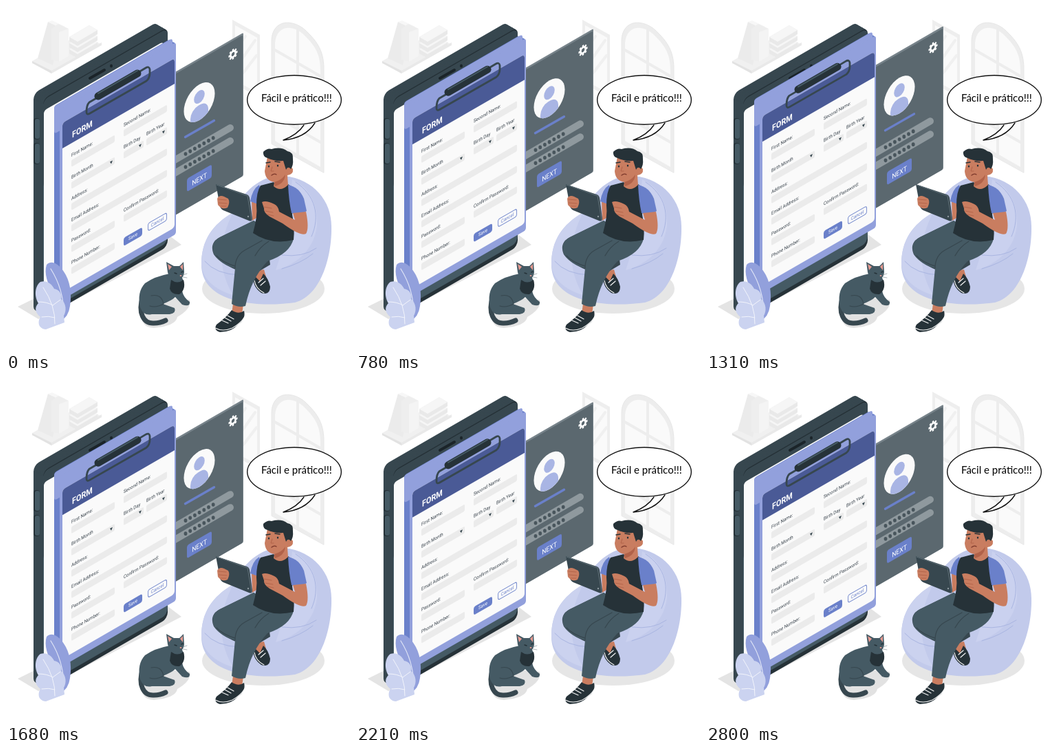
These frames come from a looping animation (500x500 px, 2840 ms). An HTML page with a canvas:

```html
<!DOCTYPE html>
<html lang="pt">
<head>
<meta charset="utf-8">
<title>Form illustration</title>
<style>
html, body { margin: 0; width: 100%; height: 100%; overflow: hidden; background: #fff; }
canvas { display: block; width: 100vw; height: 100vh; }
</style>
</head>
<body>
<canvas id="stage" width="500" height="500"></canvas>
<script>
const ctx = document.getElementById('stage').getContext('2d');
const LOOP = 2840, PEAK = 1360, RISE = 10;
const COS = 0.866, SIN = 0.5;
const INK = '#263238', SLATE = '#37474f', STEEL = '#455a64';
const BLUE = '#6a80ca', LILAC = '#92a0dc', NAVY = '#4a5a96', PALE = '#c2caeb';
const SKIN = '#c97d60', TAN = '#b16249';

function fill(d, color) {
  ctx.fillStyle = color;
  ctx.fill(new Path2D(d));
}

function line(d, color, width = 1) {
  ctx.strokeStyle = color;
  ctx.lineWidth = width;
  ctx.lineCap = ctx.lineJoin = 'round';
  ctx.stroke(new Path2D(d));
}

function oval(x, y, rx, ry, color, turn = 0) {
  ctx.beginPath();
  ctx.ellipse(x, y, rx, ry, turn, 0, Math.PI * 2);
  ctx.fillStyle = color;
  ctx.fill();
}

function box(x, y, w, h, r, color, outline) {
  ctx.beginPath();
  ctx.roundRect(x, y, w, h, r);
  if (outline) {
    ctx.strokeStyle = color;
    ctx.lineWidth = 1;
    ctx.stroke();
  } else {
    ctx.fillStyle = color;
    ctx.fill();
  }
}

// Draws on an isometric wall whose local origin is at (x, y).
function wall(x, y, draw) {
  ctx.save();
  ctx.transform(COS, -SIN, 0, 1, x, y);
  draw();
  ctx.restore();
}

const wallBox = (x, y, w, h, r, color, outline) =>
  wall(x, y, () => box(0, 0, w / COS, h, r, color, outline));

function wallText(text, x, y, size, color, weight = 400, align = 'left') {
  wall(x, y, () => {
    ctx.font = `${weight} ${size}px Roboto, sans-serif`;
    ctx.textAlign = align;
    ctx.textBaseline = 'middle';
    ctx.fillStyle = color;
    ctx.fillText(text, 0, 0);
  });
}

function slab(x, y, w, h, r, depth, side) {
  for (let i = depth; i > 0; i--) wallBox(x - i, y - i * 0.57, w, h, r, side);
}

function drawBooks() {
  fill('M38 80L110 40L139 56L66 98Z', '#f0f0f0');
  fill('M38 80L66 94L66 98L38 83Z', '#e2e2e2');
  fill('M66 94L139 53V57L66 98Z', '#e9e9e9');
  fill('M46 76L61 23L81 32L68 86Z', '#ebebeb');
  fill('M61 23L67 21L86 30L81 33Z', '#f7f7f7');
  fill('M66 33L76 26L91 33V73L77 81L66 78Z', '#eeeeee');
  fill('M77 38L91 33V73L77 81Z', '#f4f4f4');
  for (let i = 0; i < 3; i++) {
    const y = 63 - i * 9;
    fill(`M92 ${y}L121 ${y - 17}L133 ${y - 10}V${y - 4}L104 ${y + 13}L92 ${y + 6}Z`, '#e9e9e9');
    fill(`M92 ${y}L121 ${y - 17}L133 ${y - 10}L104 ${y + 7}Z`, '#f6f6f6');
  }
}

function drawWindows() {
  fill('M329 20L369 42V134L329 111Z', '#eeeeee');
  fill('M333 28L365 46V126L333 108Z', '#fafafa');
  line('M336 62L348 44M338 84L362 50M345 97L364 72', '#f0f0f0', 4);
  const arch = 'M386 200V50C387 18 420 17 440 40C456 56 462 70 462 92V242Z';
  fill(arch, '#ededed');
  fill('M391 196V54C393 27 419 25 437 46C452 61 457 74 457 94V234Z', '#fafafa');
  line('M424 34V216M391 64L457 102M391 112L457 150M391 160L457 198', '#ededed', 4);
  line(arch, '#e7e7e7');
}

function drawPhone() {
  fill('M17 437L234 331L255 347L47 455Z', '#e4e4e4');
  slab(54, 135, 181, 319, 9, 14, SLATE);
  wallBox(54, 135, 181, 319, 9, INK);
  wallBox(54, 137, 181, 311, 9, STEEL);
  wallBox(54, 137, 181, 130, 9, SLATE);
  wallBox(55, 152, 174, 257, 5, '#fafafa');
  line('M122 105L143 93', '#1b2429', 4);
  oval(153, 87, 2, 2.5, '#1b2429');
  for (const y of [163, 199]) {
    box(40, y, 9, 31, 4, INK);
    box(42, y + 1, 7, 29, 3, STEEL);
  }
}

function drawGear() {
  wall(330, 70, () => {
    ctx.strokeStyle = '#fff';
    ctx.lineCap = 'butt';
    ctx.lineWidth = 3;
    ctx.beginPath();
    ctx.arc(0, 0, 4.2, 0, Math.PI * 2);
    ctx.stroke();
    for (let i = 0; i < 8; i++) {
      ctx.rotate(Math.PI / 4);
      ctx.fillStyle = '#fff';
      ctx.fillRect(4.5, -1.4, 3, 2.8);
    }
  });
}

function drawLogin() {
  wallBox(232, 104, 113, 208, 2, '#77838a');
  wallBox(232, 107, 112, 205, 2, '#5b686f');
  drawGear();
  wall(281, 140, () => {
    oval(0, 0, 26, 26, '#fafafa');
    ctx.beginPath();
    ctx.arc(0, 0, 26, 0, Math.PI * 2);
    ctx.clip();
    oval(0, -8, 9, 9, '#a9b5e4');
    box(-15, 4, 30, 30, 13, '#a9b5e4');
  });
  line('M260.5 190.5L302.500 166.500', BLUE, 3.4);
  for (const y of [177, 196]) {
    line(`M240 ${y + 50}L326 ${y}`, '#8f999e', 10);
    for (let i = 0; i < 7; i++) oval(261 + i * 6.7, y + 38 - i * 3.87, 2.4, 2.8, '#48555c');
  }
  wallBox(263, 251, 36, 19, 3, BLUE);
  wallText('NEXT', 281, 252, 10, '#fff', 400, 'center');
}

function drawField(label, x, y, w, arrow) {
  wallText(label, x, y + 0.5, 7, '#37414a');
  wallBox(x, y + 7, w, 10, 2, '#ebebeb');
  if (arrow) {
    const ax = x + w - 5, ay = y + 12 - (w - 5) * 0.577;
    fill(`M${ax - 2} ${ay - 1}L${ax + 2} ${ay - 3}L${ax} ${ay + 2}Z`, SLATE);
  }
}

function drawClipboard() {
  slab(78, 150, 169, 279, 4, 8, BLUE);
  wallBox(70, 146, 172, 40, 4, LILAC);
  wallBox(78, 150, 169, 279, 4, LILAC);
  wallBox(82, 170, 163, 246, 5, '#fafafa');
  wallBox(82, 170, 163, 37, [5, 5, 0, 0], NAVY);
  wallText('FORM', 96, 188, 12.5, '#fff', 700);

  const wire = 'M133 133L121 140Q117 144 117 154Q117 159 122 156L204 109Q209 105 209 97V92Q208 87 203 90L193 96';
  line(wire, SLATE, 2.8);
  line('M134 131L191 98', INK, 11);
  line('M134 127L191 94', STEEL, 2);

  const left = 95, right = 171;
  drawField('First Name:', left, 217, 63);
  drawField('Second Name:', right, 173, 63);
  drawField('Birth Month', left, 249, 63, true);
  drawField('Birth Day', right, 205, 29, true);
  drawField('Birth Year', 204, 186, 30, true);
  drawField('Address:', left, 280, 139);
  drawField('Email Address:', left, 311, 139);
  drawField('Password:', left, 341, 63);
  drawField('Confirm Password:', right, 297, 63);
  drawField('Phone Number:', left, 373, 63);
  wallBox(171, 337, 27, 12, 3, BLUE);
  wallText('Save', 184.5, 335, 7, '#fff', 400, 'center');
  wallBox(206.5, 316, 27, 11, 3, BLUE, true);
  wallText('Cancel', 220, 314, 7, BLUE, 400, 'center');
}

function drawLeaves() {
  fill('M59 376C68 367 80 378 87 391C95 406 95 424 93 436Q91 452 79 458L70 420C60 404 55 388 59 376Z', LILAC);
  line('M65 382Q84 412 84 448', '#dfe4f6', 1.2);
  fill('M50 401C60 398 67 405 70 411C78 412 82 420 80 426C88 432 88 444 84 450L85 460L58 470C46 469 46 458 50 452C40 444 43 436 47 432C40 420 43 406 50 401Z', '#cbd3f0');
  line('M54 409Q72 436 71 462M47 430Q60 430 68 435M52 452Q62 450 71 453M79 427L68 435', '#f3f5fc');
}

function drawCat() {
  fill('M198 447Q195 467 215 468Q247 465 249 452Q270 440 267 427L235 424Z', '#e2e2e2');
  line('M199 422C191 446 200 462 215 461Q224 461 232 457', SLATE, 7);
  fill('M238 389Q216 393 202 403Q190 416 195 438Q200 451 212 448L238 448Q248 446 245 439L228 433Q241 428 246 423L256 434Q268 438 267 430Q258 424 256 414Q261 404 256 395Z', STEEL);
  fill('M240 398Q249 405 258 398Q262 412 252 419Q241 420 238 411Z', INK);
  line('M211 421Q226 418 229 433Q218 439 209 436', SLATE, 1.2);
  fill('M235 387L233 372L244 378L252 378L258 372L259 387Q258 398 247 398Q237 398 235 387Z', STEEL);
  fill('M235 375L237 384L241 379ZM253 379L257 375L257 384Z', '#e79a91');
  line('M245 388L248 389M255 387L257 386', INK, 1.4);
  line('M257 391L263 389M257 394L263 395', '#8d989e', 0.7);
  oval(254, 392, 1.4, 1, '#e79a91');
}

function drawBeanbag() {
  oval(374, 411, 89, 36, '#e6e6e6');
  fill('M284 376C284 340 300 318 330 300C345 268 373 244 405 247C448 252 473 284 473 320C474 360 460 420 420 431C370 438 284 434 284 376Z', PALE);
  fill('M284 376C284 340 300 318 330 300C310 340 306 380 330 420C302 412 286 396 284 376Z', '#cbd2ef');
  fill('M416 252C442 264 454 290 452 320C448 350 428 374 392 384L407 336Z', '#cad1ef');
  line('M421 256C450 275 457 306 444 335M451 352Q431 366 401 362M289 371Q305 390 340 391M401 382Q429 374 446 360', '#a9b5e1');
}

function drawLegs() {
  fill('M358 386L375 383L379 397L363 402Z', SKIN);
  fill('M360 391Q357 407 371 417Q384 421 384 408Q381 395 374 389L369 400Z', INK);
  line('M361 399Q363 411 375 417M367 402L374 396M370 406L377 400', '#f5f5f5', 1.2);
  fill('M360 312L311 336Q295 344 302 361Q312 377 357 392L384 376L378 328Z', SLATE);
  fill('M330 433L345 433L343 449L328 447Z', SKIN);
  fill('M328 442Q321 452 306 463Q301 471 311 474Q328 474 337 463Q349 455 346 443Q338 449 328 442Z', INK);
  line('M304 468Q315 474 329 468Q341 461 346 453M318 453L327 458M322 450L331 455M314 457L323 461', '#f5f5f5', 1.2);
  fill('M360 312L311 336Q296 344 302 360Q312 376 333 381L328 433Q338 439 348 436Q356 397 380 371Q413 360 418 338L391 327Z', STEEL);
  line('M333 381Q333 363 347 355L372 341M382 342Q369 350 362 363M306 363Q315 373 333 378', SLATE, 1.3);
}

function drawMan() {
  drawLegs();
  fill('M357 281L367 281L367 306L358 312Z', SKIN);
  fill('M368 260Q358 266 355 284L366 288L372 272Z', BLUE);
  fill('M370 261L389 256Q398 269 410 259L417 264Q420 280 416 303Q420 323 418 340Q385 348 359 330Q366 305 364 290Q364 270 370 261Z', INK);
  fill('M410 260Q426 263 433 280L437 298Q428 304 415 301Q411 283 410 260Z', BLUE);
  fill('M305 259L350 274Q353 275 354 279L358 309Q358 314 353 312L316 297Q312 295 311 291Z', SLATE);
  line('M306 260L351 276L357 312', '#5e6e76');
  oval(352, 306, 1.2, 1.2, '#8d989e');
  fill('M307 280Q310 274 317 277L323 280Q326 285 322 293Q314 297 308 289Z', SKIN);
  line('M309 281L320 282M309 286L321 287M312 291L320 291', TAN, 0.9);
  fill('M417 301L436 299Q441 323 436 331Q428 335 402 316L383 306Q374 300 375 294L372 285Q378 282 390 288Q396 291 397 299L420 311Z', SKIN);
  line('M375 292L386 294M377 298L388 300M380 303L389 305', TAN, 0.9);

  fill('M380 219L376 240Q377 254 390 256L389 262Q399 271 410 260L409 246Q418 245 417 237Q414 231 408 236L406 222Z', SKIN);
  fill('M390 256Q401 253 406 245Q405 258 391 262Z', TAN);
  fill('M374 212Q380 206 386 208Q400 204 409 211Q418 212 417 223Q418 231 414 237Q410 232 407 238L403 225Q390 226 380 221Q373 219 374 212Z', INK);
  line('M378 228L384 227M391 226L398 227', INK, 1.5);
  oval(382, 233, 1.2, 1.6, INK);
  oval(395, 232, 1.2, 1.6, INK);
  line('M387 234L385 240L389 240', TAN);
  line('M386 246Q390 243 393 245', '#7b382c', 1.3);
}

function drawBubble() {
  const tail = 'M433 173Q424 187 403 195Q435 192 449 170';
  oval(419, 136.5, 69, 36.5, '#111');
  oval(419, 136.5, 67.6, 35.1, '#fff');
  fill(tail, '#fff');
  line(tail, '#111', 1.4);
  ctx.font = '400 15px Lato, "Open Sans", sans-serif';
  ctx.textAlign = 'left';
  ctx.textBaseline = 'alphabetic';
  ctx.fillStyle = '#000';
  ctx.fillText('Fácil e prático!!!', 371, 139);
}

function frame() {
  const t = performance.now() % LOOP;
  const lift = RISE * (t < PEAK ? t / PEAK : (LOOP - t) / (LOOP - PEAK));

  ctx.fillStyle = '#fff';
  ctx.fillRect(0, 0, 500, 500);
  drawBooks();
  drawWindows();
  drawPhone();
  ctx.save();
  ctx.translate(0, -lift);
  drawLogin();
  drawClipboard();
  ctx.restore();
  drawLeaves();
  drawCat();
  drawBeanbag();
  drawMan();
  drawBubble();
  requestAnimationFrame(frame);
}
frame();
</script>
</body>
</html>
```
